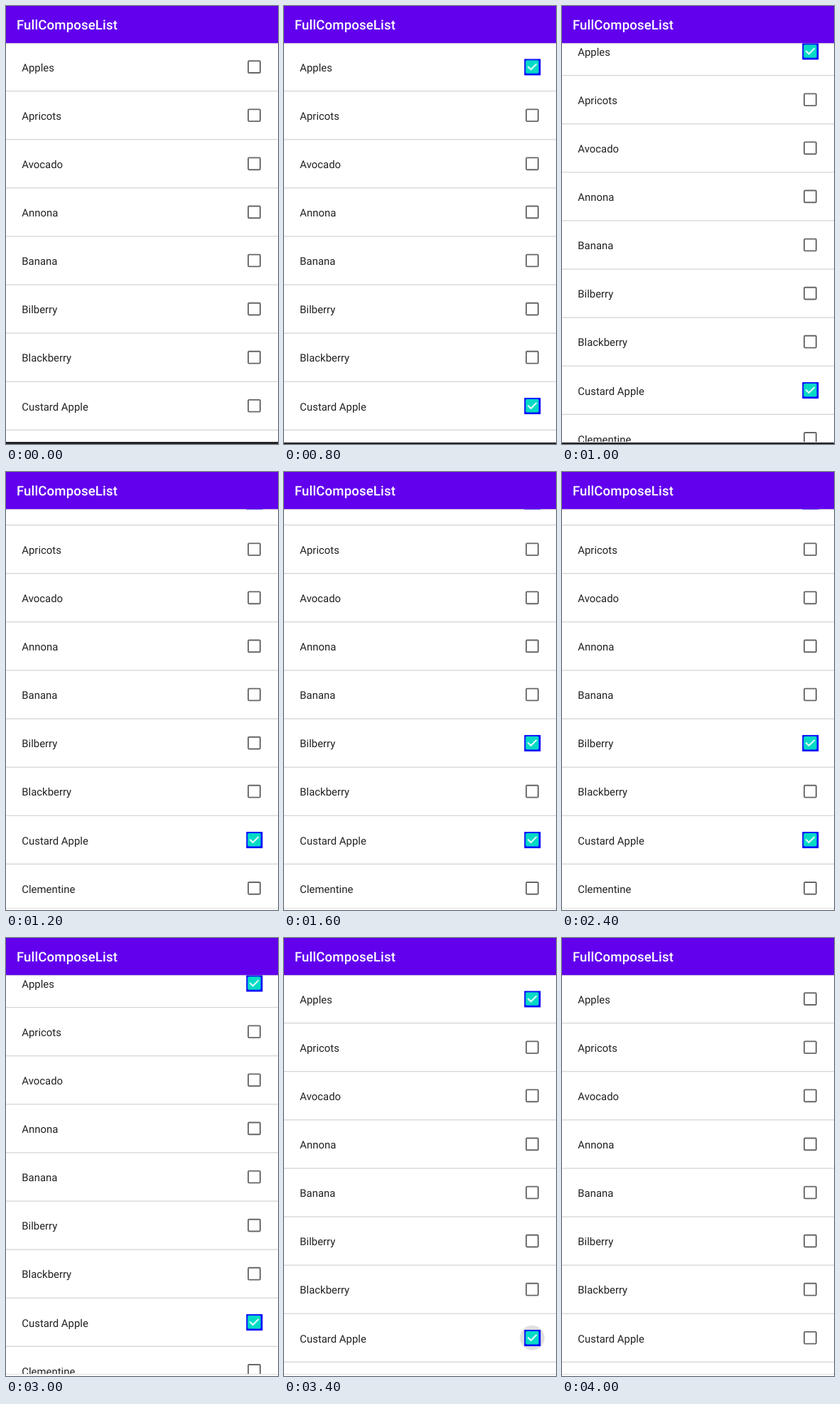
Write an HTML page that moves like this. It is 383 px wide and 616 px high and loops after 4.6 s.

```html
<!DOCTYPE html>
<html lang="en">
<head>
<meta charset="utf-8">
<title>Fruit list</title>
<style>
  html, body { margin: 0; width: 100%; height: 100%; overflow: hidden; background: #fff; }
  svg { display: block; font-family: Roboto, sans-serif; text-rendering: geometricPrecision; }
  .title { font-size: 18.6px; font-weight: 500; letter-spacing: .14px; fill: #fff; }
  .label { font-size: 14.9px; fill: #212121; }

  #list, .on, .ripple, .strip rect { animation: 4.6s step-end infinite; }
  #list { animation-name: scroll; }
  .on, .ripple { opacity: 0; }
  .Apples .on { animation-name: first-on; }
  .Apples .ripple { animation-name: first-tap; }
  .Custard .on { animation-name: second-on; }
  .Custard .ripple { animation-name: second-tap; }
  .Bilberry .on { animation-name: third-on; }
  .Bilberry .ripple { animation-name: third-tap; }
  .strip .edge { animation-name: edge; }
  .strip .bar { animation-name: bar; }

  @keyframes scroll {
    0%, 69.56%, 100% { transform: none; }
    21.73%, 65.21% { transform: translateY(-22px); }
    26.08%, 52.17% { transform: translateY(-45px); }
    43.47% { transform: translateY(-58px); }
  }
  @keyframes first-on { 0%, 86.95%, 100% { opacity: 0; } 4.34% { opacity: 1; } }
  @keyframes first-tap { 0%, 8.69%, 86.95%, 100% { opacity: 0; } 4.34%, 82.6% { opacity: 1; } }
  @keyframes second-on { 0%, 78.26%, 100% { opacity: 0; } 13.04% { opacity: 1; } }
  @keyframes second-tap { 0%, 17.39%, 78.26%, 100% { opacity: 0; } 13.04%, 73.91% { opacity: 1; } }
  @keyframes third-on { 0%, 60.86%, 100% { opacity: 0; } 30.43% { opacity: 1; } }
  @keyframes third-tap { 0%, 34.78%, 60.86%, 100% { opacity: 0; } 30.43%, 56.52% { opacity: 1; } }
  @keyframes edge { 0% { fill: #222; } 4.34%, 100% { fill: #dedede; } }
  @keyframes bar { 0% { fill: #222; } 26.08%, 100% { fill: #fff; } }
</style>
</head>
<body>
<svg width="383" height="616" viewBox="0 0 383 616">
  <g id="list"></g>
  <rect y="52" width="383" height="1" fill="#000" fill-opacity=".14"/>
  <rect y="53" width="383" height="1" fill="#000" fill-opacity=".05"/>
  <rect width="383" height="52.13" fill="#6200ee"/>
  <text class="title" x="14.9" y="33.3">FullComposeList</text>
  <g class="strip">
    <rect class="edge" y="613" width="383" height="1"/>
    <rect class="bar" y="614" width="383" height="2"/>
  </g>
</svg>
<script>
  const fruits = ['Apples', 'Apricots', 'Avocado', 'Annona', 'Banana', 'Bilberry',
    'Blackberry', 'Custard Apple', 'Clementine'];
  const rippleRadius = { Apples: 20.8, 'Custard Apple': 18.7, Bilberry: 16.2 };
  const listTop = 52.13, rowHeight = 68.09, dp = .931;

  // Checkbox units are dp, measured from its centre.
  const checkedLayer = radius => `
    <circle class="ripple" r="${radius}" fill="#000" fill-opacity=".12"/>
    <g class="on">
      <rect x="-12" y="-12" width="24" height="24" fill="#00f"/>
      <rect x="-10" y="-10" width="20" height="20" rx="2" fill="#03dac6"/>
      <path d="M-6 0l4 4 8-8" fill="none" stroke="#fff" stroke-width="2" stroke-linecap="square"/>
    </g>`;

  const row = (name, i) => `
    <g class="${name}" transform="translate(0 ${listTop + i * rowHeight})">
      <rect y="67.03" width="383" height="1.06" fill="#ccc"/>
      <text class="label" x="22.3" y="39.8">${name}</text>
      <g transform="translate(349.5 33.51) scale(${dp})">
        <rect x="-9" y="-9" width="18" height="18" rx="1.2" fill="none" stroke="#666" stroke-width="2"/>
        ${name in rippleRadius ? checkedLayer(rippleRadius[name]) : ''}
      </g>
    </g>`;

  document.getElementById('list').innerHTML = fruits.map(row).join('');
</script>
</body>
</html>
```
